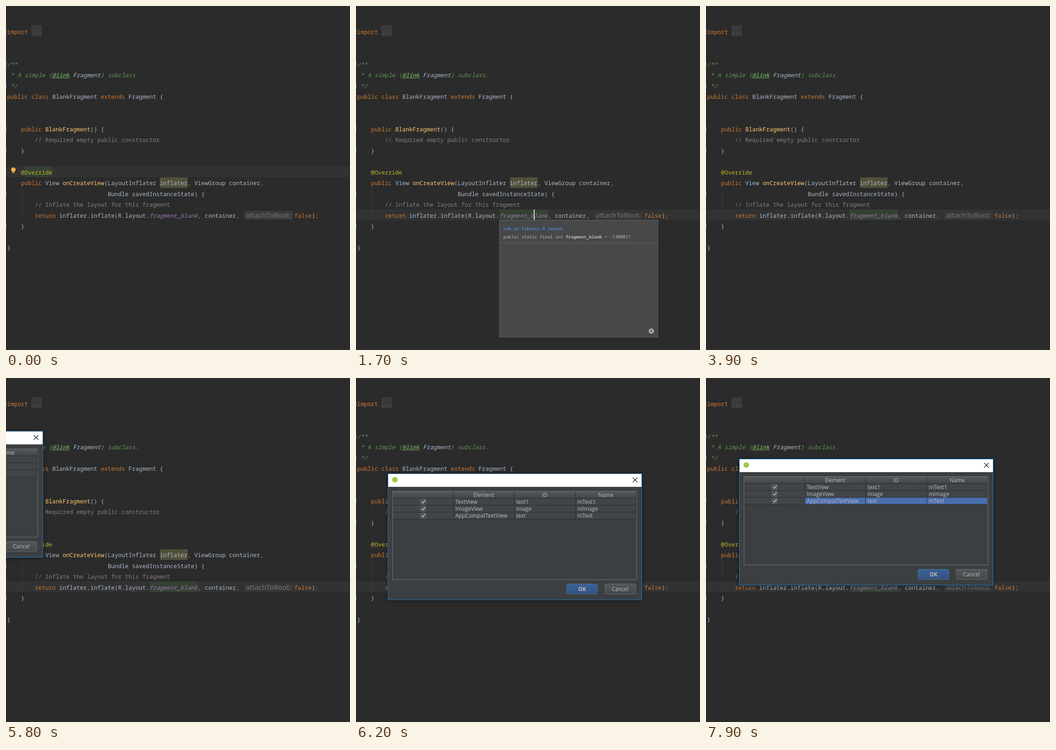
Animation, 747 px wide and 749 px high, one loop 8 s. Source, as an HTML page:

```html
<!DOCTYPE html>
<html lang="en">
<head>
<meta charset="utf-8">
<title>Code generation in an editor</title>
<style>
  html, body { margin: 0; width: 100%; height: 100%; overflow: hidden; background: #2b2b2b; }
  svg { display: block; width: 100%; height: 100%; }
  text { white-space: pre; }
  .code { font: 12.56px "Noto Sans Mono", "DejaVu Sans Mono", monospace; fill: #a9b7c6; }
  .doc { font: 9.42px "Noto Sans Mono", "DejaVu Sans Mono", monospace; fill: #bbb; }
  .ui { font: 11.75px "Open Sans", "Noto Sans", sans-serif; fill: #bbb; }
  .hint { font: 15.2px "Open Sans", "Noto Sans", sans-serif; fill: #787878; }
  .mid { text-anchor: middle; }
  .end { text-anchor: end; }
  .bold { font-weight: bold; }
  .keyword { fill: #cc7832; }
  .method { fill: #ffc66d; }
  .comment { fill: #808080; }
  .javadoc { fill: #629755; font-style: italic; }
  .tag { font-weight: bold; text-decoration: underline; }
  .type { fill: #a9b7c6; }
  .annotation { fill: #bbb529; }
  .field { fill: #9876aa; font-style: italic; }
  .frame { filter: drop-shadow(0 1px 4px #0008); }
</style>
</head>
<body>
<svg viewBox="0 0 747 749" preserveAspectRatio="none">
  <defs>
    <linearGradient id="headFill" x2="0" y2="1">
      <stop stop-color="#55595b"/><stop offset="1" stop-color="#414547"/>
    </linearGradient>
    <linearGradient id="okFill" x2="0" y2="1">
      <stop stop-color="#3a6299"/><stop offset="1" stop-color="#335280"/>
    </linearGradient>
    <linearGradient id="cancelFill" x2="0" y2="1">
      <stop stop-color="#53585a"/><stop offset="1" stop-color="#444849"/>
    </linearGradient>
  </defs>

  <rect width="747" height="749" fill="#2b2b2b"/>
  <rect id="activeRow" width="747" height="23.5" fill="#323232"/>
  <rect id="overrideMark" x="40" y="349" width="61" height="23" fill="#344134"/>
  <rect id="fieldMark" x="312" y="443" width="105" height="23" fill="#344134"/>
  <rect x="334.5" y="373" width="60" height="23" fill="#52503a"/>
  <rect x="55" y="42" width="23" height="24" fill="#3a3a3a"/>
  <rect id="hintBox" x="517" y="446" width="106.5" height="19" rx="3"/>
  <path d="M35.5 396V467" stroke="#3a3a3a"/>
  <g id="gutter" fill="#70757a"></g>
  <g id="code" class="code"></g>
  <text class="hint" x="521" y="461">attachToRoot:</text>
  <rect id="caret" x="386" y="443" width="2" height="23" fill="#d8d8d8"/>
  <g id="bulb">
    <circle cx="16" cy="6" r="5" fill="#f4af3d"/>
    <path d="M13.5 9h5v2h-5z" fill="#f4af3d"/>
    <path d="M13.5 12h5v1.6h-5z" fill="#a0a4a8"/>
  </g>

  <g id="quickDoc">
    <rect x="311.5" y="466.5" width="344" height="254.5" fill="#46484a" stroke="#616467"/>
    <path d="M312 516H655" stroke="#5e6163"/>
    <text class="doc" x="320" y="488" style="fill:#589df6">com.yx.library.R.layout</text>
    <text class="doc" x="320" y="506">public static final int <tspan class="bold">fragment_blank</tspan> = -1300017</text>
    <g fill="none" stroke="#afb1b3">
      <circle cx="641.3" cy="707.7" r="3.4" stroke-width="2.8"/>
      <circle cx="641.3" cy="707.7" r="5.2" stroke-width="2" stroke-dasharray="2.04"/>
    </g>
  </g>

  <g id="menu">
    <rect x="386.5" y="465.5" width="201" height="233" fill="#3c3f41" stroke="#616467"/>
    <rect x="387" y="466" width="200" height="22.5" fill="#4a4d50"/>
    <rect id="selection" x="387" width="200" height="18.85" fill="#4b6eaf"/>
    <text class="ui mid" x="489" y="481.5">Generate</text>
    <g id="menuItems" class="ui"></g>
  </g>

  <g id="dialog">
    <rect class="frame" x=".5" y=".5" width="551" height="274.5" fill="#3c3f41" stroke="#1a80d2"/>
    <rect x="1" y="1" width="550" height="28" fill="#fff"/>
    <circle cx="15.5" cy="13.5" r="6" fill="#a0c845"/>
    <path d="M532 9l10 10m0-10l-10 10" stroke="#111" stroke-width="1.1"/>
    <g id="table"></g>
    <rect x="388.5" y="240.5" width="67" height="22" rx="2" fill="url(#okFill)" stroke="#4c708c"/>
    <text class="ui mid bold" x="422" y="255.5">OK</text>
    <rect x="471.5" y="240.5" width="67" height="22" rx="2" fill="url(#cancelFill)" stroke="#65696b"/>
    <text class="ui mid" x="504.5" y="255.5">Cancel</text>
  </g>
</svg>
<script>
const LOOP = 8000;
const byId = id => document.getElementById(id);

// Editor text: [row, class and text pairs...]
const ROW = 23.5, CODE_X = 2.5;
const lines = [
  [0, 'keyword', 'import ', 'comment', '...'],
  [3, 'javadoc', '/**'],
  [4, 'javadoc', ' * A simple {', 'javadoc tag', '@link', 'javadoc type', ' Fragment', 'javadoc', '} subclass.'],
  [5, 'javadoc', ' */'],
  [6, 'keyword', 'public class ', '', 'BlankFragment ', 'keyword', 'extends ', '', 'Fragment {'],
  [9, 'keyword', '    public ', 'method', 'BlankFragment', '', '() {'],
  [10, 'comment', '        // Required empty public constructor'],
  [11, '', '    }'],
  [13, 'annotation', '    @Override'],
  [14, 'keyword', '    public ', '', 'View ', 'method', 'onCreateView', '', '(LayoutInflater inflater',
    'keyword', ', ', '', 'ViewGroup container', 'keyword', ','],
  [15, '', ' '.repeat(29) + 'Bundle savedInstanceState) {'],
  [16, 'comment', '        // Inflate the layout for this fragment'],
  [17, 'keyword', '        return ', '', 'inflater.inflate(R.layout.', 'field', 'fragment_blank',
    'keyword', ', ', '', 'container', 'keyword', ','],
  [18, '', '    }'],
  [20, '', '}'],
];
const baseline = row => 61.3 + row * ROW;
const codeLine = (x, row, runs) => {
  let spans = '';
  for (let i = 0; i < runs.length; i += 2) spans += `<tspan class="${runs[i]}">${runs[i + 1]}</tspan>`;
  return `<text x="${x}" y="${baseline(row)}">${spans}</text>`;
};
byId('code').innerHTML = lines.map(([row, ...runs]) => codeLine(CODE_X, row, runs)).join('') +
  codeLine(626, 17, ['keyword', 'false', '', ')', 'keyword', ';']);
byId('gutter').innerHTML = [0, 3, 5, 9, 11, 15, 18]
  .map(row => `<rect y="${51 + row * ROW}" width="1" height="10"/>`).join('');

// Popup menu
const ITEM = 18.85, MENU_TOP = 489.9;
const menuItems = ['Constructor', 'toString()', 'Override Methods...|Ctrl+O', 'Delegate Methods...', 'Test...',
  'Super Method Call', 'GsonFormat|Alt+S', 'LayoutCreator', 'FindViewById|Ctrl+U', 'Copyright', 'Parcelable'];
byId('menuItems').innerHTML = menuItems.map((item, i) => {
  const [label, shortcut = ''] = item.split('|');
  const y = MENU_TOP + i * ITEM + 13.3;
  return `<text x="412.5" y="${y}">${label}</text><text class="end" x="577.5" y="${y + .7}">${shortcut}</text>`;
}).join('');

// Dialog table
const columns = [10.5, 142.5, 274.5, 407.5, 539.5];
const rowTop = i => 54 + i * 15;
const elements = [['TextView', 'text1', 'mText1'], ['ImageView', 'image', 'mImage'], ['AppCompatTextView', 'text', 'mText']];
const headers = ['Element', 'ID', 'Name'].map((name, i) =>
  `<text class="ui mid" x="${(columns[i + 1] + columns[i + 2]) / 2}" y="51">${name}</text>`);
const cells = elements.map((values, i) => {
  const y = rowTop(i);
  return `<path d="M10.5 ${y + 15}H539.5" stroke="#2b2d2e"/>
    <rect x="71.5" y="${y + 2}" width="11" height="11" rx="1.5" fill="#4a4e50" stroke="#73777a"/>
    <path d="M74 ${y + 7.2}l2.5 3 4.5-6.2" fill="none" stroke="#ccc" stroke-width="1.5"/>` +
    values.map((value, j) => `<text class="ui" x="${columns[j + 1] + 4.2}" y="${y + 12.2}">${value}</text>`).join('');
});
byId('table').innerHTML = `
  <rect x="10.5" y="38.5" width="530" height="192.5" fill="none" stroke="#707476"/>
  <rect x="11" y="39" width="528.5" height="15" fill="url(#headFill)"/>
  <rect x="11" y="54" width="528.5" height="45" fill="#414547"/>
  <rect id="selectedRow" x="143" y="84" width="396" height="15" fill="#4b6eaf"/>
  <path d="M11 54H539.5${columns.slice(1).map(x => `M${x} 39V99`).join('')}" stroke="#2b2d2e"/>` +
  headers.join('') + cells.join('');

// Stepped values: [start time, value...]
const menuSteps = [[2300, 0], [3100, 6], [3200, 9], [3500, 8]];
const dialogSteps = [[5800, -471.5, 115.5], [5900, -290, 190], [6000, -110, 250], [6100, 20, 263],
  [6200, 69, 208], [6300, 72, 185], [6400, 72, 176]];
const stepAt = (steps, t) => steps.reduce((current, step) => t >= step[0] ? step : current);

function draw() {
  const t = performance.now() % LOOP;
  const show = (id, from, to = LOOP) =>
    byId(id).setAttribute('visibility', t >= from && t < to ? 'visible' : 'hidden');
  const clicked = t >= 1100;

  byId('activeRow').setAttribute('y', clicked ? 443 : 349);
  byId('hintBox').setAttribute('fill', clicked ? '#373737' : '#3b3b3b');
  show('overrideMark', 0, 1400);
  show('fieldMark', 1400);
  show('caret', 1100, 2000);
  byId('bulb').setAttribute('transform', `translate(0 ${clicked ? 445 : 350.5})`);
  byId('bulb').setAttribute('visibility', !clicked || t >= 1800 && t < 2300 ? 'visible' : 'hidden');
  show('quickDoc', 1700, 2300);

  show('menu', 2300, 3900);
  byId('selection').setAttribute('y', MENU_TOP + stepAt(menuSteps, t)[1] * ITEM);

  show('dialog', 5800);
  const [, x, y] = stepAt(dialogSteps, t);
  byId('dialog').setAttribute('transform', `translate(${x} ${y})`);
  show('selectedRow', 7900);
  requestAnimationFrame(draw);
}
draw();
</script>
</body>
</html>
```
